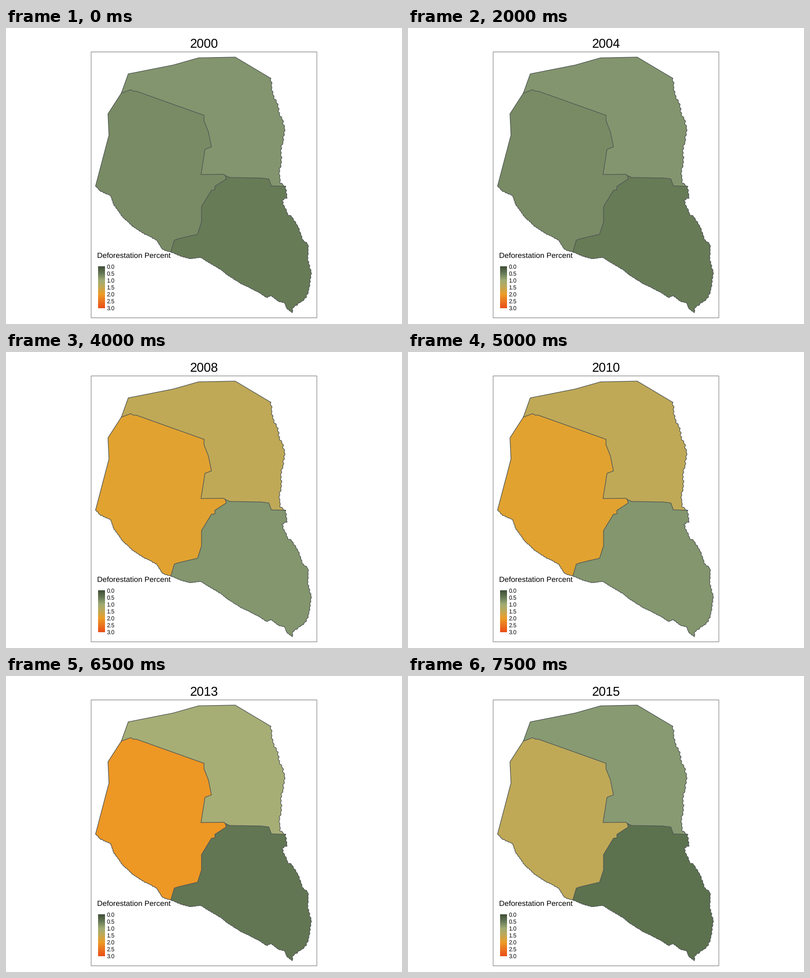
These frames come from a looping animation (800 px wide and 600 px high, 8 s). A matplotlib script:

```python
import numpy as np
import matplotlib.pyplot as plt
from matplotlib.animation import FuncAnimation
from matplotlib.colors import LinearSegmentedColormap, to_rgb
from matplotlib.patches import Polygon, Rectangle

W, H, DPI = 800, 600, 100
PX = 72 / DPI
YEARS = range(2000, 2016)

plt.rcParams["font.family"] = "Liberation Sans"
plt.rcParams["text.hinting"] = "none"

rng = np.random.default_rng(4)


def pts(*xy):
    return np.array(xy, float).reshape(-1, 2)


def coast(key, step, rough):
    """Shore through the key points: alternating random bends, rounded off."""
    dist = np.r_[0, np.cumsum(np.hypot(*np.diff(key, axis=0).T))]
    n = int(dist[-1] / step)
    s = np.linspace(0, dist[-1], n)
    p = np.column_stack([np.interp(s, dist, axis) for axis in key.T])
    along = np.gradient(p, axis=0)
    normal = along[:, ::-1] * (1, -1) / np.hypot(*along.T)[:, None]
    bend = rough * rng.uniform(0.1, 1, n) * (-1) ** np.arange(n)
    bend[[0, -1]] = 0
    p += normal * bend[:, None]
    for _ in range(2):  # corner cutting
        cut = np.stack([0.75 * p[:-1] + 0.25 * p[1:],
                        0.25 * p[:-1] + 0.75 * p[1:]], axis=1).reshape(-1, 2)
        p = np.vstack([p[:1], cut, p[-1:]])
    return p


# Outer edges
top = pts(233, 132, 247, 93, 338, 75, 389, 60.5, 463, 59, 535, 102)
west = pts(233, 132, 206, 174, 208, 217, 181, 320)
northeast = coast(pts(
    535, 102, 536, 122, 540, 140, 550, 156, 550, 172, 558, 182, 563, 206,
    560, 230, 555, 244, 557, 264, 552, 296, 555, 316, 565, 321), 4.5, 2.8)
southeast = coast(pts(
    565, 321, 568, 345, 557, 349, 569, 378, 579, 384, 591, 406, 599, 430,
    610, 438, 610, 470, 617, 498, 610, 538, 604, 549, 580, 566, 578, 577), 4, 2.2)
southwest = coast(pts(
    181, 320, 190, 330, 211, 340, 217, 357, 234, 381, 256, 402, 277, 416,
    305, 430, 316, 449, 333, 454), 3, 1.2)
south = coast(pts(
    333, 454, 352, 462, 373, 468, 393, 465, 436, 491, 446, 500, 473, 517,
    511, 536, 527, 547, 535, 542, 550, 554, 563, 557, 567, 568, 578, 577), 3, 0.9)

# Inner borders, all meeting at (443, 299)
north_west = pts(
    233, 132, 252, 125, 257, 128, 263, 128, 400, 177, 400, 188, 409, 211,
    415, 241, 402, 246, 394, 297, 440, 296.5, 443, 299)
north_south = pts(
    443, 299, 452, 303, 515, 304, 531, 306, 536, 320, 565, 321)
west_south = pts(
    443, 299, 445, 306, 422, 321, 422, 328, 415, 329, 395, 362, 395, 393,
    387, 418, 349, 427, 340, 430, 333, 454)

REGIONS = [
    [top, northeast, north_south[::-1], north_west[::-1]],
    [west, southwest, west_south[::-1], north_west[::-1]],
    [north_south, southeast, south[::-1], west_south[::-1]],
]
EDGES = [top, west, northeast, southeast, southwest, south,
         north_west, north_south, west_south]

# First year of each period: fills for north, west, south
PERIODS = {
    2000: ("#83956e", "#798b65", "#677b57"),
    2005: ("#bfa957", "#e1a230", "#83966e"),
    2011: ("#a6ae76", "#e6a02d", "#627653"),
    2015: ("#889a72", "#bfa957", "#5c724e"),
}
WEST_2011, WEST_2014 = (np.array(to_rgb(c)) for c in ("#e6a02d", "#f09321"))


def fills(year):
    start = max(y for y in PERIODS if y <= year)
    north, west_fill, south_fill = PERIODS[start]
    if start == 2011:
        west_fill = WEST_2011 + (WEST_2014 - WEST_2011) * (year - 2011) / 3
    return north, west_fill, south_fill


fig = plt.figure(figsize=(W / DPI, H / DPI), dpi=DPI, facecolor="white")
ax = fig.add_axes([0, 0, 1, 1])
ax.axis("off")

# Legend
ramp = LinearSegmentedColormap.from_list("ramp", [
    (0, "#404e38"), (1 / 6, "#667b56"), (1 / 3, "#a0ac74"),
    (1 / 2, "#c1a855"), (2 / 3, "#ed9d27"), (1, "#ea4f19")])
ax.imshow(np.linspace(0, 1, 85)[:, None], cmap=ramp, extent=(186, 200, 568, 483),
          aspect="auto", interpolation="nearest", zorder=3)
ax.set(xlim=(0, W), ylim=(H, 0))


def label(x, y, s, size, **kw):
    return ax.text(x, y, s, fontsize=size * PX, color="black",
                   va="baseline", zorder=5, **kw)


label(183.9, 467, "Deforestation Percent", 15.36)
for i in range(7):
    label(203.3, 487.4 + 14 * i, f"{i / 2:.1f}", 11.52)
title = label(400, 39.4, "", 25.6, ha="center")

# Map
ax.add_patch(Rectangle((172, 48.5), 456, 539, fill=False, ec="#707070",
                       lw=PX, snap=False))
areas = [ax.add_patch(Polygon(np.vstack(r), closed=True, lw=0)) for r in REGIONS]
for edge in EDGES:
    ax.plot(*edge.T, color="#4d5452", lw=1.25 * PX, solid_joinstyle="round", zorder=2)


def draw(i):
    year = YEARS[i]
    title.set_text(str(year))
    for area, color in zip(areas, fills(year)):
        area.set_facecolor(color)
    return [title, *areas]


anim = FuncAnimation(fig, draw, frames=len(YEARS), interval=500,
                     repeat=True, repeat_delay=0, blit=False)
plt.show()
```
